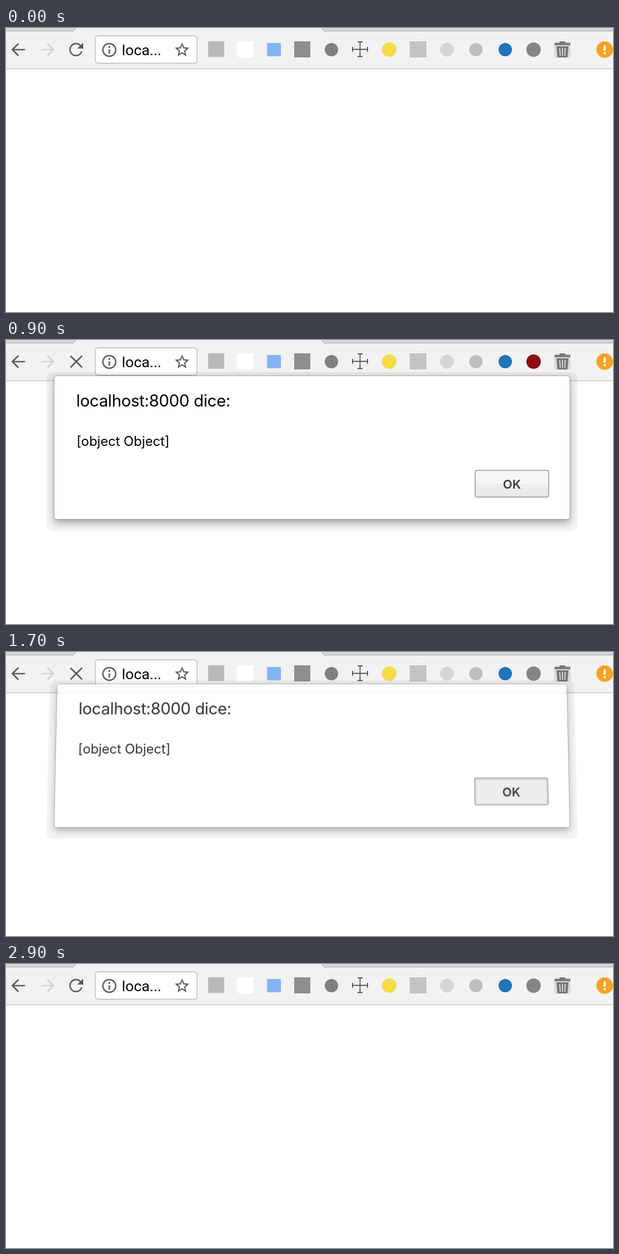
Recreate the animation shown at these times as an HTML page. Size 1093 px wide and 512 px high, loop 3000 ms.

```html
<!DOCTYPE html>
<html lang="en">
<head>
<meta charset="utf-8">
<title>Browser alert</title>
<style>
html, body { margin: 0; width: 100%; height: 100%; overflow: hidden; background: #fff; }
svg { position: absolute; left: 0; top: 0; }
#dialog {
  position: absolute; left: 87px; top: 65px; width: 928px; height: 258px;
  background: #fff; border-radius: 4px; transform-origin: 50% 100%;
  box-shadow: 0 0 0 1px rgba(0,0,0,.25), 0 6px 14px rgba(0,0,0,.35), 0 7px 0 14px rgba(0,0,0,.05);
}
#dialog text { font-family: Inter, "Open Sans", sans-serif; }
#button {
  position: absolute; left: 757px; top: 169px; width: 130px; height: 46px;
  border: 2px solid #b0b0b0; border-radius: 4px;
  background: linear-gradient(#f6f6f6 0 50%, #eee 50%, #e9e9e9);
  box-shadow: 0 1px 2px rgba(0,0,0,.15);
}
#button.pressed { background: #ebebeb; border-color: #a2a2a2; box-shadow: inset 0 1px 4px rgba(0,0,0,.25); }
</style>
</head>
<body>
<svg width="1093" height="512">
  <!-- toolbar and tab strip -->
  <path fill="#f2f2f2" d="M0 0H1093V73H0z"/>
  <path fill="#d6d6d6" d="M0 0H126L122 5H0zM569 0H1093V5H572z"/>
  <path fill="none" stroke="#a8a8a8" d="M0 5.5H121.500Q123.500 5 125.500 0M569 0Q570.500 5 572.500 5.500H1093"/>
  <path fill="#b8b8b8" d="M0 73H1093V74H0z"/>
  <!-- navigation -->
  <g fill="none" stroke="#5a5a5a" stroke-width="2.6">
    <path d="M34 39H12M22.500 28L11.500 39L22.500 50"/>
    <path stroke="#d2d2d2" d="M62 39H85M74.500 28L85.500 39L74.500 50"/>
    <path id="stop" d="M116 28.500L137 49.500M137 28.500L116 49.500"/>
    <g id="reload">
      <path d="M136.400 42A10.800 10.800 0 1 1 134.300 32"/>
      <path fill="#5a5a5a" stroke="none" d="M139 26.500V37H128.500z"/>
    </g>
  </g>
  <!-- address field -->
  <rect x="161" y="14" width="183" height="49.500" rx="5" fill="#fff" stroke="#b8b8b8" stroke-width="1.300"/>
  <circle cx="186" cy="39.500" r="11.500" fill="none" stroke="#5a5a5a" stroke-width="2.400"/>
  <path stroke="#5a5a5a" stroke-width="2.800" d="M186 33V36M186 38.500V46"/>
  <text x="208.500" y="49" font-size="26.700" font-family="Roboto, sans-serif">loca...</text>
  <path fill="#5a5a5a" transform="translate(301.400 23.600) scale(1.3)" d="M22 9.24l-7.19-.62L12 2 9.19 8.63 2 9.24l5.46 4.73L5.82 21 12 17.27 18.18 21l-1.63-7.03L22 9.24zM12 15.4l-3.76 2.27 1-4.28-3.32-2.88 4.38-.38L12 6.1l1.71 4.04 4.38.38-3.32 2.88 1 4.28z"/>
  <!-- extensions -->
  <rect x="364" y="24" width="29" height="28" fill="#b9b9b9"/>
  <rect x="416" y="24" width="29" height="29" rx="4" fill="#fff"/>
  <rect x="470" y="27" width="25" height="24" rx="2" fill="#83b5f3"/>
  <rect x="519" y="24" width="29" height="29" fill="#8f8f8f"/>
  <circle cx="586" cy="39" r="12" fill="#808080"/>
  <path fill="none" stroke="#555" stroke-width="1.800" d="M624 38.500H651M637.500 25V52M624 34V43M651 34V43M633 25H642M633 51.500H642"/>
  <circle cx="690" cy="39" r="13" fill="#f5dc4a"/>
  <rect x="727" y="24" width="30" height="29" fill="#c3c3c3"/>
  <circle cx="794" cy="39" r="12.500" fill="#d6d6d6"/>
  <circle cx="846" cy="39" r="12" fill="#bebebe"/>
  <circle cx="899" cy="39" r="12" fill="#2272bd"/>
  <circle id="shield" cx="950" cy="39" r="13"/>
  <rect x="987" y="24" width="30" height="30" rx="4" fill="#dcdcdc"/>
  <path fill="#777" d="M988 27H996L998 24H1006L1008 27H1016V31H988zM991 33H1013L1011 53H993z"/>
  <path stroke="#dcdcdc" stroke-width="1.800" d="M997 36L998 50M1002 36V50M1007 36L1006 50"/>
  <circle cx="1078" cy="39" r="15" fill="#f5a423"/>
  <path stroke="#fff" stroke-width="4" d="M1078 31V41M1078 43.500V47"/>
</svg>
<div id="dialog">
  <div id="button"></div>
  <svg width="928" height="258">
    <text x="39.500" y="55" font-size="29.500" letter-spacing="-.35">localhost:8000 dice:</text>
    <text x="40" y="126" font-size="24" letter-spacing="-.1">[object Object]</text>
    <text id="ok" x="824" y="203" font-size="22" font-weight="600" text-anchor="middle">OK</text>
  </svg>
</div>
<script>
const el = id => document.getElementById(id);
const clamp = v => Math.min(1, Math.max(0, v));
const show = (id, on) => { el(id).style.display = on ? '' : 'none'; };
const start = performance.now();

// away: 0 = dialog in place, 1 = lifted and gone
function poseDialog(away) {
  const tilt = .086 * away;
  const style = el('dialog').style;
  show('dialog', away < 1);
  style.opacity = clamp(1 - 1.3 * away);
  style.transform =
    `matrix3d(1,0,0,0, 0,${1 + tilt},0,${-tilt / 258}, 0,0,1,0, 0,${-50 * away},0,1)`;
}

function draw(now) {
  const t = Math.floor(Math.max(0, now - start) % 3000 / 100) * 100;
  const loading = t >= 500 && t < 2000;
  const closing = t >= 1700;

  show('stop', loading);
  show('reload', !loading);
  el('shield').setAttribute('fill', t >= 500 && t < 1300 ? '#8c0f13' : '#858585');
  el('button').className = closing ? 'pressed' : '';
  el('ok').setAttribute('fill', closing ? '#111' : '#3c3c3c');

  const opened = clamp((t - 500) / 146);
  const closed = clamp((t - 1625) / 200);
  poseDialog(closing ? closed ** 2 : (1 - opened) ** 2);
  requestAnimationFrame(draw);
}
draw(start);
</script>
</body>
</html>
```
